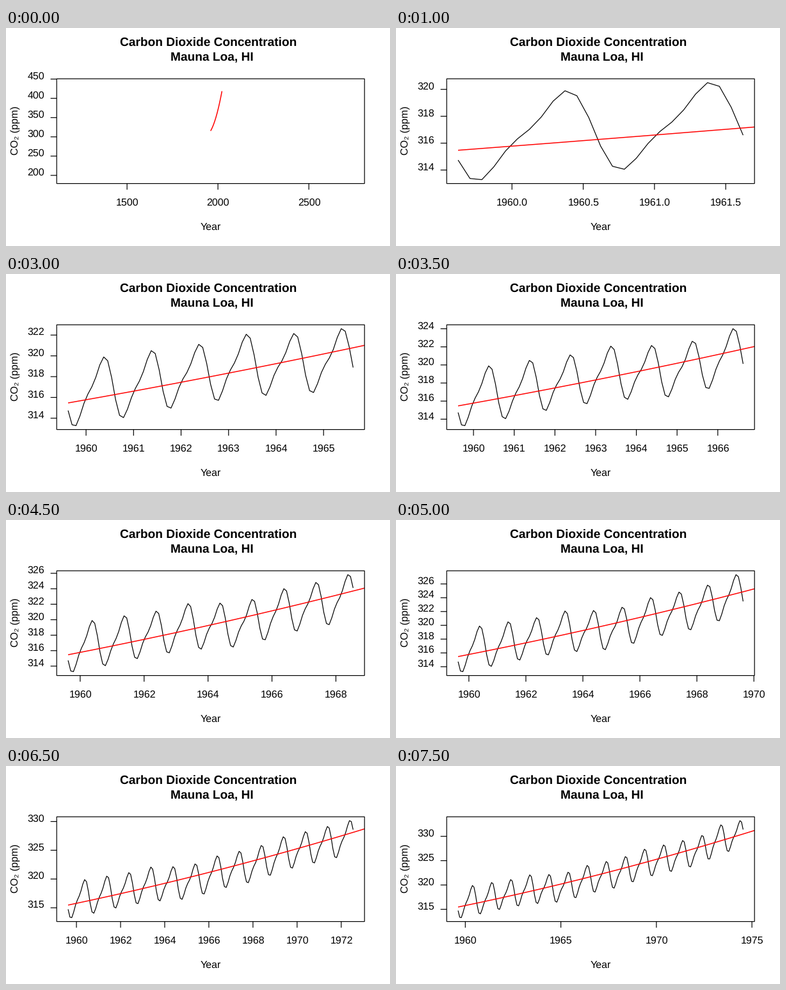
Write a matplotlib script that moves like this. It is 600 px wide and 340 px high and loops after 8000 ms.

```python
import math

import matplotlib.pyplot as plt
import numpy as np
from matplotlib.animation import FuncAnimation
from matplotlib.patches import Rectangle

W, H, DPI = 600, 340, 100
LEFT, RIGHT, TOP, BOTTOM = 79.22, 560.18, 79.22, 242.58
PT = 72 / DPI  # points per pixel
THIN, THICK = 1.2, 1.5
FONT = ["Liberation Sans", "DejaVu Sans"]
plt.rcParams["text.hinting"] = "none"

START = 1959.622  # mid-August
STEPS = 16
SHORT_STEPS = (1, 5, 9, 13, 15)  # years that stop one month early

# Slow wander around the trend: (years since start, ppm).
DRIFT = [(0, 0.45), (0.7, 0.95), (1.3, 0.4), (1.8, 0.7), (2.8, 0.4),
         (3.7, 0.55), (4.2, 0), (5.6, -0.9), (6.7, -0.4), (8.5, -0.75),
         (9.7, -0.15), (12.7, -0.75), (13.6, 0.4), (15, -0.05)]


def trend(t):
    return 315.47 + 0.803 * t + 0.0136 * t * t


def season(t):
    a = 2 * np.pi * t
    return (-0.76 * np.cos(a) - 2.49 * np.sin(a)
            - 0.42 * np.cos(2 * a) - 0.65 * np.sin(2 * a))


MONTHS = np.arange(12 * STEPS) / 12
CO2 = trend(MONTHS) + season(MONTHS) + np.interp(MONTHS, *zip(*DRIFT))
TREND_T = np.linspace(0, 62.4, 750)


def limits(values):
    lo, hi = values.min(), values.max()
    if lo == hi:
        lo, hi = 0.6 * lo, 1.4 * hi
    pad = 0.04 * (hi - lo)
    return lo - pad, hi + pad


def ticks(lo, hi):
    """Round tick values, about five steps across the axis."""
    cell = (hi - lo) / 5
    base = 10 ** math.floor(math.log10(cell))
    unit = base
    for factor, bias in ((2, 0.8), (5, 1.7), (10, 0.8)):
        if factor * base - cell >= bias * (cell - unit):
            break
        unit = factor * base
    fmt = "{:.1f}" if unit < 1 else "{:.0f}"
    first, last = math.ceil(lo / unit), math.floor(hi / unit)
    return [(k * unit, fmt.format(k * unit)) for k in range(first, last + 1)]


fig = plt.figure(figsize=(W / DPI, H / DPI), dpi=DPI, facecolor="white")
ax = fig.add_axes([0, 0, 1, 1])


def stroke(xs, ys, color="black", width=THIN):
    return ax.plot(xs, ys, color=color, lw=width * PT, snap=False,
                   solid_joinstyle="round", solid_capstyle="butt")[0]


def label(x, y, text, size=16, ha="center", **kw):
    ax.text(x, y, text, fontsize=size * PT, family=FONT, ha=ha, va="baseline", **kw)


def draw(i):
    ax.clear()
    ax.set(xlim=(0, W), ylim=(H, 0))
    ax.axis("off")

    n = 12 * i + 1 - (i in SHORT_STEPS)
    years, levels = START + MONTHS[:n], CO2[:n]
    x0, x1 = limits(years)
    y0, y1 = limits(levels)

    def px(x):
        return LEFT + (x - x0) / (x1 - x0) * (RIGHT - LEFT)

    def py(y):
        return BOTTOM - (y - y0) / (y1 - y0) * (BOTTOM - TOP)

    box = ax.add_patch(Rectangle((LEFT, TOP), RIGHT - LEFT, BOTTOM - TOP, fill=False,
                                 ec="black", lw=THIN * PT, snap=False, zorder=4))
    for curve in (stroke(px(years), py(levels)),
                  stroke(px(START + TREND_T), py(trend(TREND_T)), "red", THICK)):
        curve.set_clip_path(box)

    for value, text in ticks(x0, x1):
        x = px(value)
        stroke([x, x], [BOTTOM, BOTTOM + 9.6])
        label(x + 0.3, 277, text)
    for value, text in ticks(y0, y1):
        y = py(value)
        stroke([LEFT - 9.6, LEFT], [y, y])
        label(LEFT - 19.2, y, text, ha="right")

    mid = (LEFT + RIGHT) / 2
    label(mid - 3.2, 28, "Carbon Dioxide Concentration", 19.2, weight="bold")
    label(mid + 2, 51, "Mauna Loa, HI", 19.2, weight="bold")
    label(mid + 0.3, 315, "Year")
    label(18.6, (TOP + BOTTOM) / 2 - 1, "CO\u2082 (ppm)", rotation=90,
          rotation_mode="anchor")
    return []


anim = FuncAnimation(fig, draw, frames=STEPS, init_func=lambda: [], interval=500,
                     repeat=True, repeat_delay=0, blit=False)
plt.show()
```
